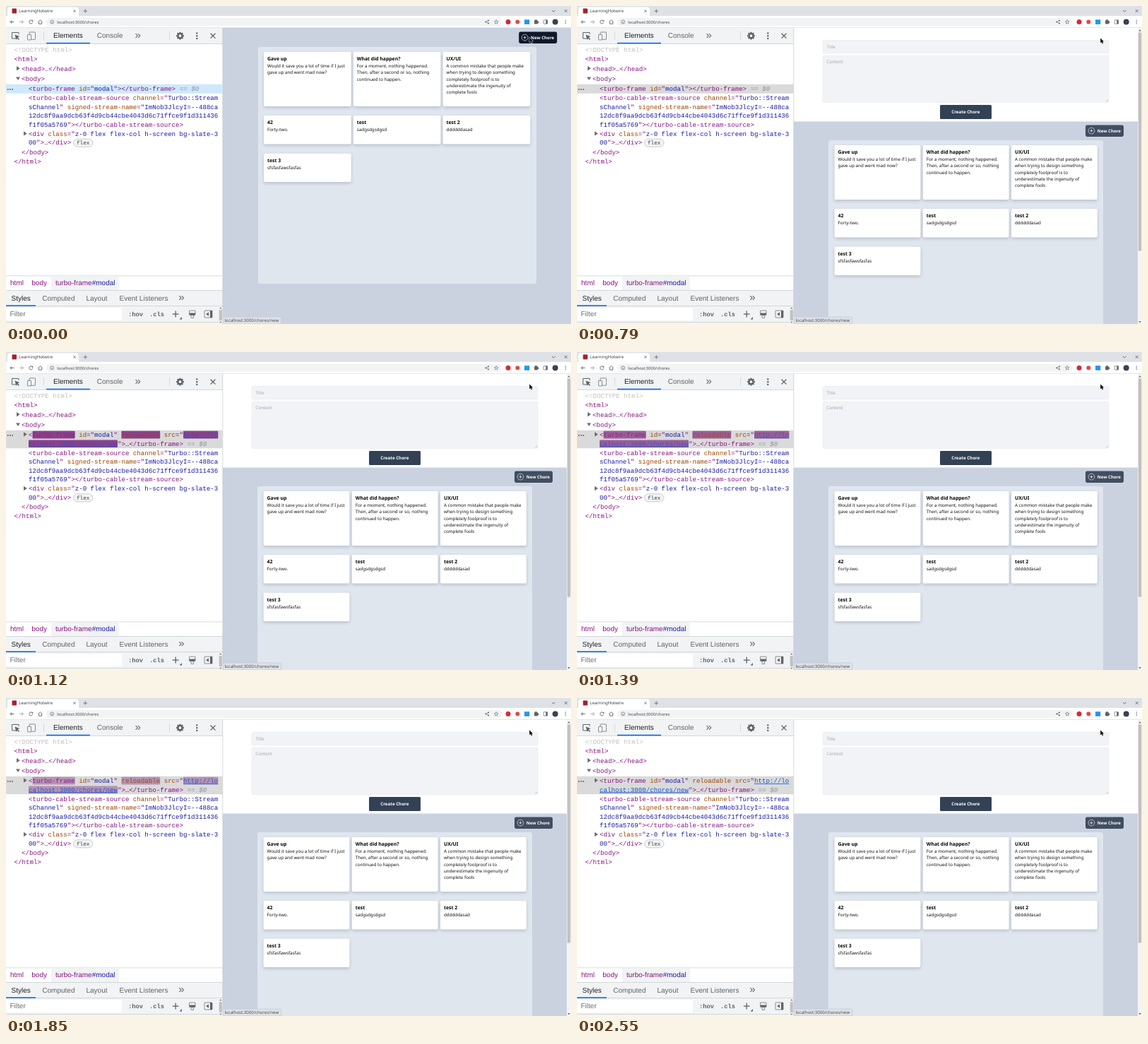
Animation, 800 px wide and 450 px high, one loop 2910 ms. Source, as an HTML page with a canvas:

```html
<!DOCTYPE html>
<html lang="en">
<head>
<meta charset="utf-8">
<title>Chores</title>
<style>
  html, body { margin: 0; width: 100%; height: 100%; overflow: hidden; background: #fff; }
  canvas { display: block; width: 800px; height: 450px; }
</style>
</head>
<body>
<canvas id="stage" width="800" height="450"></canvas>
<script>
const ctx = document.getElementById('stage').getContext('2d');
const SANS = '"Noto Sans", sans-serif';
const UI = '"Liberation Sans", Arial, sans-serif';
const MONO = '"Liberation Mono", monospace';
const TAG = '#881280', ATTR = '#994500', VALUE = '#1a1aa6', LINK = '#1155cc', ICON = '#5f6368';

const LOOP = 2910, BLUR_AT = 640, FORM_AT = 700, TREE_AT = 1090, FADE = 1430;

const CARDS = [
  ['Gave up', 'Would it save you a lot of time if I just', 'gave up and went mad now?'],
  ['What did happen?', 'For a moment, nothing happened.', 'Then, after a second or so, nothing', 'continued to happen.'],
  ['UX/UI', 'A common mistake that people make', 'when trying to design something', 'completely foolproof is to', 'underestimate the ingenuity of', 'complete fools'],
  ['42', 'Forty-two.'],
  ['test', 'sadgsdgsdgsd'],
  ['test 2', 'ddddddasad'],
  ['test 3', 'sfsfasfawsfasfas']
];

function box(x, y, w, h, fill, radius = 0, stroke) {
  ctx.beginPath();
  ctx.roundRect(x, y, w, h, radius);
  if (fill) { ctx.fillStyle = fill; ctx.fill(); }
  if (stroke) { ctx.strokeStyle = stroke; ctx.lineWidth = 0.7; ctx.stroke(); }
}

// y is the optical middle of the line
function text(str, x, y, size, color, family = SANS, style = '') {
  ctx.font = `${style} ${size}px ${family}`;
  ctx.fillStyle = color;
  ctx.fillText(str, x, y + size * 0.34);
  return ctx.measureText(str).width;
}

function path(points, color, width = 1, closed = false) {
  ctx.beginPath();
  for (let i = 0; i < points.length; i += 2) ctx.lineTo(points[i], points[i + 1]);
  if (closed) ctx.closePath();
  ctx.strokeStyle = color;
  ctx.lineWidth = width;
  ctx.stroke();
}

function shape(points, color) {
  ctx.beginPath();
  for (let i = 0; i < points.length; i += 2) ctx.lineTo(points[i], points[i + 1]);
  ctx.fillStyle = color;
  ctx.fill();
}

function dot(x, y, r, color) {
  ctx.beginPath();
  ctx.arc(x, y, r, 0, 7);
  ctx.fillStyle = color;
  ctx.fill();
}

function ring(x, y, r, color, width = 1, from = 0, to = Math.PI * 2) {
  ctx.beginPath();
  ctx.arc(x, y, r, from, to);
  ctx.strokeStyle = color;
  ctx.lineWidth = width;
  ctx.stroke();
}

function cross(x, y, r, color, width) {
  path([x - r, y - r, x + r, y + r], color, width);
  path([x + r, y - r, x - r, y + r], color, width);
}

function plus(x, y, r, color, width) {
  path([x - r, y, x + r, y], color, width);
  path([x, y - r, x, y + r], color, width);
}

function menuDots(x, y, step, r, color) {
  for (const i of [-1, 0, 1]) dot(x, y + i * step, r, color);
}

function gear(x, y) {
  for (let i = 0; i < 8; i++) {
    const a = i * Math.PI / 4, c = Math.cos(a), s = Math.sin(a);
    path([x + 3 * c, y + 3 * s, x + 5.4 * c, y + 5.4 * s], ICON, 2.2);
  }
  ring(x, y, 3.1, ICON, 2.4);
}

function browserBar() {
  box(0, 0, 800, 15, '#dee1e6');
  box(2, 1.5, 101, 16, '#fff', 4);
  box(0, 14, 800, 17, '#fff');
  box(0, 30.3, 800, 0.7, '#dcdee2');
  box(8.5, 3.5, 6.5, 7, '#a3242b', 1);
  text('LearningHotwire', 18.3, 7.2, 6.08, '#3c4043');
  cross(97, 7.2, 1.7, ICON, 0.8);
  plus(112.3, 7.2, 2.7, ICON, 0.8);
  path([773, 6, 775.3, 8.3, 777.6, 6], ICON, 0.9);
  cross(792.7, 7, 1.9, ICON, 0.9);

  path([11.5, 22.5, 6, 22.5], ICON, 0.9);
  path([8.5, 20, 6, 22.5, 8.5, 25], ICON, 0.9);
  path([19, 22.5, 24.5, 22.5], '#a4a7ab', 0.9);
  path([22, 20, 24.5, 22.5, 22, 25], '#a4a7ab', 0.9);
  ring(35.3, 22.5, 2.5, ICON, 0.9, 0.3, 5.5);
  shape([36, 22, 38.3, 22, 38.3, 19.6], ICON);
  path([45.5, 22.5, 48.5, 19.8, 51.5, 22.5], ICON, 0.9);
  path([46.4, 22.3, 46.4, 25.3, 50.6, 25.3, 50.6, 22.3], ICON, 0.9);
  box(57, 16.8, 645, 11.5, '#f1f3f4', 5.7);
  ring(65.2, 22.5, 2.5, ICON, 0.7);
  path([65.2, 22, 65.2, 24], ICON, 0.7);
  text('localhost:3000/chores', 72.3, 22.6, 5.72, '#45494d');

  path([683, 20.5, 679.5, 22.5, 683, 24.5], ICON, 0.6);
  for (const [x, y] of [[683, 20.5], [679.3, 22.5], [683, 24.5]]) dot(x, y, 1, ICON);
  const star = [];
  for (let i = 0; i < 10; i++) {
    const a = i * Math.PI / 5 - Math.PI / 2, r = i % 2 ? 1.3 : 3;
    star.push(694.2 + r * Math.cos(a), 22.6 + r * Math.sin(a));
  }
  path(star, ICON, 0.6, true);
  dot(711, 22.5, 3.5, '#d32b35');
  dot(724.3, 22.5, 3, '#e5483f');
  box(734, 19.3, 7.2, 6.6, '#2196f3');
  box(748, 20.3, 5.2, 5.2, ICON, 0.8);
  dot(750.4, 20.1, 1.2, ICON);
  dot(753.3, 22.9, 1.2, ICON);
  box(761.2, 19.8, 5.4, 5.4, null, 0.5, ICON);
  box(764.3, 19.8, 2.3, 5.4, ICON);
  dot(777.7, 22.5, 4, '#39424f');
  menuDots(792.2, 22.5, 2.2, 0.7, ICON);
}

function toolsChrome() {
  box(0, 31, 307, 419, '#fff');
  box(0, 31, 307, 22.5, '#f1f3f4');
  box(0, 53, 307, 0.7, '#cacdd1');
  path([16, 46, 8.5, 46, 8.5, 37.5, 18, 37.5, 18, 40], ICON, 1);
  shape([12.5, 40.5, 19.5, 43.3, 16.6, 44.3, 19, 46.9, 17.9, 48, 15.6, 45.4, 14.5, 48], ICON);
  box(33, 37, 8.5, 10.3, null, 0.5, ICON);
  box(30.5, 40.5, 5, 7.5, '#f1f3f4', 0.5, ICON);
  box(53, 36, 0.7, 12, '#cacdd1');
  text('Elements', 67, 42, 10, '#202124', UI);
  box(57, 51.7, 62, 1.8, '#1a73e8');
  text('Console', 128.8, 42, 10, ICON, UI);
  text('»', 182.4, 41, 15, ICON, UI);
  box(231, 36, 0.7, 12, '#cacdd1');
  gear(246.5, 42.2);
  menuDots(270.3, 42.2, 3.8, 1.2, ICON);
  cross(293, 42.2, 3.4, ICON, 1.3);

  box(0, 381.6, 307, 0.7, '#cacdd1');
  box(64, 382.3, 96, 19.7, '#f1f3f4');
  text('html', 6, 392, 10, TAG, UI);
  text('body', 36.3, 392, 10, TAG, UI);
  const w = text('turbo-frame', 70, 392, 10, TAG, UI);
  text('#modal', 70 + w, 392, 10, VALUE, UI);
  box(0, 402, 307, 48, '#f1f3f4');
  box(0, 402, 307, 0.7, '#cacdd1');
  text('Styles', 7.5, 413.3, 10, '#202124', UI);
  text('Computed', 51.3, 413.3, 10, ICON, UI);
  text('Layout', 113.5, 413.3, 10, ICON, UI);
  text('Event Listeners', 160.5, 413.3, 10, ICON, UI);
  text('»', 244.3, 412.3, 15, ICON, UI);
  box(0, 424.3, 307, 0.7, '#cacdd1');
  box(0, 423.3, 42, 1.7, '#1a73e8');
  box(0, 427, 164, 18, '#fff');
  text('Filter', 5.5, 436, 10, '#6b6f73', UI);
  box(0, 447.3, 301, 0.7, '#cacdd1');
  text(':hov', 173, 436, 8.75, ICON, MONO, 'bold');
  text('.cls', 203, 436, 8.75, ICON, MONO, 'bold');
  plus(240.2, 436, 4.4, ICON, 1.3);
  shape([249, 440, 249, 443.5, 245.5, 443.5], ICON);
  box(259.5, 431, 8.5, 4.2, null, 0.5, ICON);
  box(259.3, 434.6, 9, 3, ICON);
  box(262, 437.5, 3.6, 4, null, 0.5, ICON);
  box(281, 431, 11, 10, null, 0.5, ICON);
  box(289, 431, 3, 10, ICON);
  shape([287, 433.2, 287, 438.8, 283.2, 436], ICON);
  box(301, 425, 6, 25, '#f4f4f4');
  box(301.7, 430, 4.2, 15, '#c1c1c1');
  shape([302, 428.3, 305.6, 428.3, 303.8, 426.3], '#777');
  shape([302, 446.8, 305.6, 446.8, 303.8, 448.8], '#777');
  box(306.5, 31, 0.7, 419, '#c4c8cd');
}

// Each run is [string, color, highlight alpha]
function code(x, y, ...runs) {
  for (const [str, color, glow = 0] of runs) {
    ctx.font = `9.15px ${MONO}`;
    const width = ctx.measureText(str).width;
    if (glow > 0) box(x, y - 5.2, width, 10.6, `rgba(138,62,138,${glow})`, 1);
    ctx.globalAlpha = 1 - 0.5 * glow * glow;
    text(str, x, y, 9.15, color, MONO);
    if (color === LINK) box(x, y + 4, width, 0.8, LINK);
    ctx.globalAlpha = 1;
    x += width;
  }
  return x;
}

function arrow(x, y, open) {
  shape(open ? [x - 3, y - 2, x + 3, y - 2, x, y + 2.5] : [x - 2, y - 3.2, x + 2.8, y, x - 2, y + 3.2], '#6e6e6e');
}

function tree(t) {
  const loaded = t >= TREE_AT;
  const glow = loaded ? Math.max(0, 1 - (t - TREE_AT) / FADE) : 0;
  const frameTag = 'turbo-frame', streamTag = 'turbo-cable-stream-source';
  code(11.5, 62, ['<!DOCTYPE html>', '#c0c0c0']);
  code(11.5, 75.3, ['<html>', TAG]);
  arrow(17, 88.3);
  code(22, 88.5, ['<head>', TAG], ['…', '#333'], ['</head>', TAG]);
  arrow(17, 102.5, true);
  code(22, 102.5, ['<body>', TAG]);

  box(0, 110.8, 307, loaded ? 25.4 : 13, t < BLUR_AT ? '#cfe8fc' : '#dadada');
  for (const x of [2.8, 6, 9.2]) dot(x, 118, 0.9, '#5a5a5a');
  const id = [[' id', ATTR], ['="', TAG], ['modal', VALUE], ['"', TAG]];
  let end, y = 117;
  if (loaded) {
    arrow(27, 116.5);
    code(32, y, ['<', TAG], [frameTag, TAG, glow], ...id, [' ', ATTR],
      ['reloadable', ATTR, glow], [' src', ATTR], ['="', TAG], ['http://lo', LINK, glow]);
    y += 12.6;
    end = code(32, y, ['calhost:3000/chores/new', LINK, glow], ['">', TAG], ['…', '#333'], [`</${frameTag}>`, TAG]);
  } else {
    end = code(32, y, [`<${frameTag}`, TAG], ...id, [`></${frameTag}>`, TAG]);
  }
  text('== $0', end + 5.8, y, 9.15, '#8d9299', MONO, 'italic');

  y += 12.9;
  code(32, y, [`<${streamTag}`, TAG], [' channel', ATTR], ['="', TAG], ['Turbo::Stream', VALUE]);
  code(32, y + 12.5, ['sChannel', VALUE], ['"', TAG], [' signed-stream-name', ATTR], ['="', TAG], ['ImNob3JlcyI=--488ca', VALUE]);
  code(32, y + 25, ['12dc8f9aa9dcb63f4d9cb44cbe4043d6c71ffce9f1d311436', VALUE]);
  code(32, y + 37.5, ['f1f05a5769', VALUE], [`"></${streamTag}>`, TAG]);
  y += 50.7;
  arrow(27, y - 0.2);
  code(32, y, ['<div', TAG], [' class', ATTR], ['="', TAG], ['z-0 flex flex-col h-screen bg-slate-3', VALUE]);
  code(32, y + 12.7, ['00', VALUE], ['">', TAG], ['…', '#333'], ['</div>', TAG]);
  box(95.5, y + 7.5, 27.5, 11.2, '#f1f3f4', 5.5, '#b9bdc2');
  text('flex', 100, y + 12.9, 7.7, '#3c4043', MONO);
  code(22, y + 26, ['</body>', TAG]);
  code(11.5, y + 39, ['</html>', TAG]);
}

function newChoreButton(x, y, fill) {
  box(x, y, 54, 16.5, fill, 2.3);
  ring(x + 8.4, y + 8.2, 4.4, '#fff', 0.6);
  plus(x + 8.4, y + 8.2, 2.1, '#fff', 0.7);
  text('New Chore', x + 16.8, y + 8.1, 6.1, '#fff', SANS, 'bold');
}

function cards(left, top, step, width) {
  const rows = [[0, 77], [90, 40.5], [143.7, 40.3]];
  CARDS.forEach(([title, ...lines], i) => {
    const [dy, height] = rows[Math.floor(i / 3)];
    const x = left + (i % 3) * step, y = top + dy;
    ctx.save();
    ctx.shadowColor = 'rgba(40,55,80,0.22)';
    ctx.shadowBlur = 4;
    ctx.shadowOffsetY = 2;
    box(x, y, width, height, '#fff', 2);
    ctx.restore();
    text(title, x + 5, y + 10.1, 6.85, '#000', SANS, 'bold');
    lines.forEach((line, n) => text(line, x + 5, y + 20 + n * 9.25, 6.25, '#111'));
  });
}

function form() {
  box(307, 31, 487, 132.5, '#fff');
  box(348, 48.5, 405, 18.5, '#f1f3f6', 2, '#e9ecf0');
  text('Title', 353.5, 57.8, 6.2, '#a0a6b0');
  box(348, 70, 405, 66.5, '#f1f3f6', 2, '#e9ecf0');
  text('Content', 353.3, 79, 6.2, '#a0a6b0');
  path([749.3, 135.3, 752, 132.6], '#8c929b', 0.5);
  path([751, 135.3, 752, 134.3], '#8c929b', 0.5);
  box(514, 140, 73, 20, '#334155', 1.5);
  text('Create Chore', 530.2, 150.2, 6.2, '#fff', SANS, 'bold');
}

function pointer(x, y) {
  const outline = [0, 0, 0, 7, 1.6, 5.5, 2.7, 8, 3.9, 7.5, 2.8, 5, 4.9, 4.9].map((v, i) => v + (i % 2 ? y : x));
  path(outline, '#fff', 1, true);
  shape(outline, '#000');
}

function page(t) {
  box(307, 31, 493, 419, '#cad2e0');
  if (t < FORM_AT) {
    box(357, 58, 394, 335, '#e0e6ee', 3);
    cards(365, 65, 126.8, 123.7);
    newChoreButton(726.2, 36.4, '#0f172a');
    pointer(741.2, 44.6);
  } else {
    box(356, 190, 389, 270, '#e0e6ee', 3);
    cards(364.6, 197, 125.2, 121.8);
    form();
    newChoreButton(720, 168.4, '#414d61');
    box(794, 31, 6, 419, '#f4f4f4');
    box(794.8, 37.5, 4.4, 309, '#c1c1c1');
    shape([795.2, 35.5, 798.8, 35.5, 797, 33.3], '#666');
    shape([795.2, 446, 798.8, 446, 797, 448.2], '#666');
    pointer(741.2, 45.6);
  }
  box(306.8, 440, 83, 10, '#dee1e6', [0, 2, 0, 0], '#c3c8d0');
  text('localhost:3000/chores/new', 309.5, 445, 6.08, '#4a4e53');
}

function draw(now) {
  const t = now % LOOP;
  ctx.textRendering = 'geometricPrecision';
  browserBar();
  page(t);
  toolsChrome();
  tree(t);
  requestAnimationFrame(draw);
}
requestAnimationFrame(draw);
</script>
</body>
</html>
```
